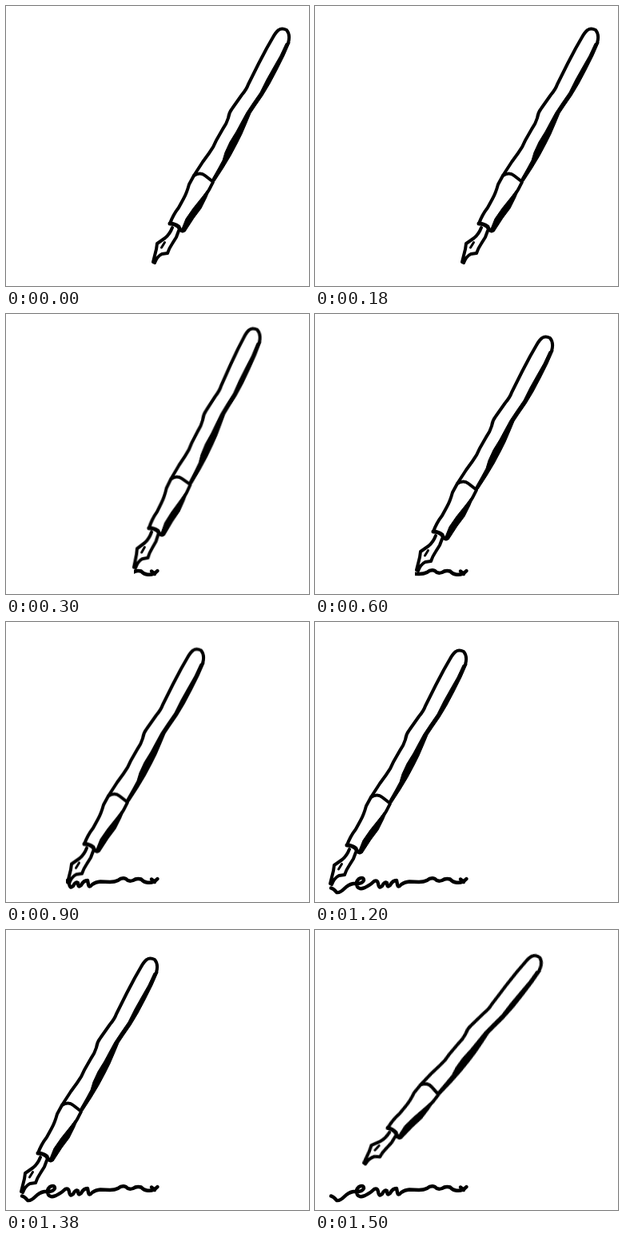
Animation of 379 by 350 pixels, one loop 1800 ms. Source, as an HTML page:

```html
<!DOCTYPE html>
<html lang="en">
<head>
<meta charset="utf-8">
<title>Writing pen</title>
<style>
  html, body { margin: 0; width: 100%; height: 100%; overflow: hidden; background: #fff; }
  svg { display: block; width: 379px; height: 350px; }
  path { fill: none; stroke: #000; stroke-width: 4; stroke-linecap: round; stroke-linejoin: round; }
  .paper { fill: #fff; stroke: none; }
  .shade { fill: #000; stroke-width: 1; }
  .ink { stroke-width: 4.4; }
  .bold { stroke-width: 5; }
  .slit { stroke-width: 3; }
  .cover { fill: #fff; animation: reveal 1800ms step-end infinite; }
  .pen { animation: write 1800ms step-end infinite; }

  /* The pen is placed by its nib tip. */
  @keyframes write {
    0%     { transform: translate(185px, 321px); }
    16.66% { transform: translate(161px, 317.5px) rotate(-2.5deg); }
    33.33% { transform: translate(128px, 321px); }
    50%    { transform: translate(78px, 326.5px); }
    66.66% { transform: translate(20px, 328px); }
    83.33% { transform: translate(62px, 292.3px) rotate(10.7deg) scale(1.01); }
  }
  /* Hides the part of the line that is not written yet. */
  @keyframes reveal {
    0%     { transform: translateX(200px); }
    16.66% { transform: translateX(160px); }
    33.33% { transform: translateX(125px); }
    50%    { transform: translateX(75px); }
    66.66%, 100% { transform: translateX(0); }
  }
</style>
</head>
<body>
<svg viewBox="0 0 379 350">
  <path class="ink" d="M189.500 321Q184 327 176 325.500Q172 325 169 321.500Q163 320 159 323Q153 325 150 321Q145 319 140 323
    Q136 325 130 325L118 324.500Q112 325 108 328Q104 333 103 328L102 323Q97 323 94 329Q90 333 90 326
    Q87 324 84 330Q80 334 79 327Q78 322 74 324Q70 328 66 330Q57 336 53 331Q50 325 55 321Q61 318 61 323
    Q59 328 48 327Q42 328 37 333Q31 339 27 338Q23 333 20 332.500"/>
  <path class="ink" d="M182 321.500L186 325"/>
  <rect class="cover" x="-200" y="300" width="200" height="50"/>

  <g class="pen"><g transform="translate(-185 -321)">
    <path class="paper" d="M341 31L353 32L353 46L260 219L221 281L216 281L203 308L185 321L190 296L208 277L205 272L235 212L303 98Z"/>
    <!-- barrel -->
    <path d="M235 212L246 195L254 184Q260 176 263 168L271 154Q276 147 278 140Q279 133 283 128L295 111
      Q301 104 303 98L310 84L316 72L326 53L334 39Q338 32 341 30Q345 27 351 30Q356 36 353 46"/>
    <path class="shade" d="M355 46L348 62L339 80L330 97L321 112L312 125L306 134L301 146L295 160L289 172L281 187L272 202L261 219
      L257 218L265 204L271 193L274 183L280 170L288 157L295 144L301 133L309 121L318 108L326 92L335 76L343 62L350 47Z"/>
    <!-- grip -->
    <path d="M235 212Q243 207 249 212L258 219M235 212L229 223Q226 234 222 241L216 252Q209 261 205 272"/>
    <path d="M259 220Q254 231 248 239L239 253Q231 262 222 281"/>
    <path class="shade" d="M256 225L246 238L234 253L225 266L219 281L224 282L235 265L244 253L251 239Z"/>
    <path class="bold" d="M205 272Q211 272 216 276Q217 280 221 281"/>
    <!-- nib -->
    <path d="M208 277Q205 285 199 290L189 297L188 304L184 320L186 321Q189 313 195 310L202 309
      Q204 303 208 297L213 289L216 281"/>
    <path class="slit" d="M198.500 295.500L194.500 302"/>
  </g></g>
</svg>
</body>
</html>
```
